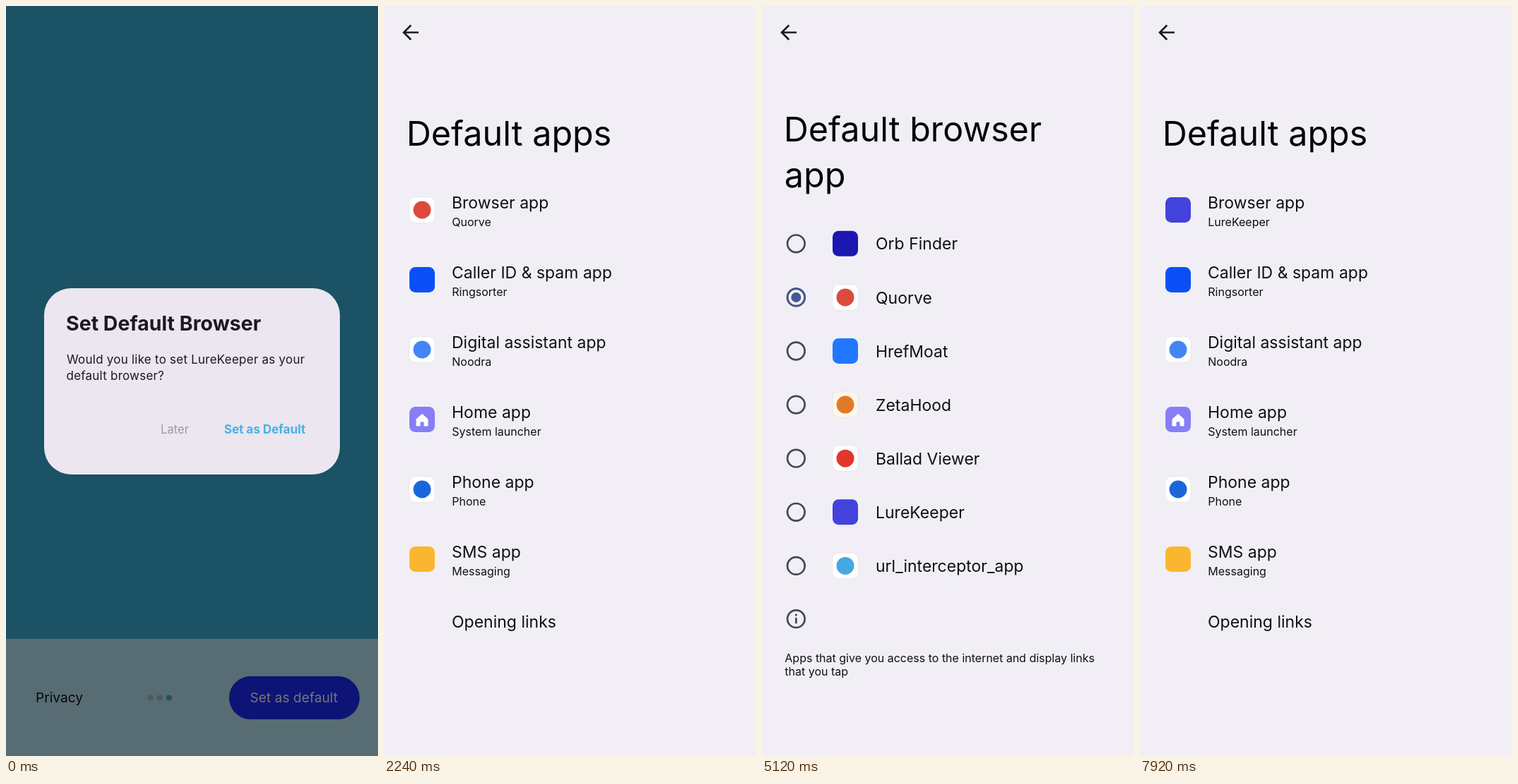
Recreate the animation shown at these times as an HTML page. Size 527 by 1063 pixels, loop 8 s.

```html
<!DOCTYPE html>
<html lang="en">
<head>
<meta charset="utf-8">
<title>Set default browser</title>
<style>
  html, body { margin: 0; width: 100%; height: 100%; overflow: hidden; background: #f1eff5; }
  svg { display: block; width: 100%; height: 100%; }
  text { font-family: Inter, Roboto, sans-serif; font-optical-sizing: none; fill: #101013; white-space: pre; }
  .head { font-size: 48.5px; fill: #050506; }
  .item { font-size: 23px; }
  .note { font-size: 16px; }
  .title { font-size: 28.5px; font-weight: 700; fill: #1c1a21; }
  .body { font-size: 17px; letter-spacing: .23px; fill: #1c1a21; }
  .later { font-size: 16.6px; fill: #9c99a1; }
  .accept { font-size: 17px; font-weight: 700; fill: #41b4e6; }
  .bar { font-size: 19.2px; }
  .line { fill: none; stroke: #1d1b21; stroke-width: 2.7; }
  .ring { fill: none; stroke: #48464e; stroke-width: 2.7; }
  .on .ring { stroke: #43598f; }
  .on .dot { fill: #43598f; }
  .wave, .dot { transform-box: fill-box; transform-origin: center; }
</style>
</head>
<body>
<svg viewBox="0 0 527 1063" preserveAspectRatio="none">
  <defs>
    <clipPath id="pillClip"><rect x="293" y="573" width="148" height="54" rx="27"/></clipPath>
    <clipPath id="rowClip"><rect y="240" width="527" height="99"/></clipPath>
    <clipPath id="pickClip"><rect y="680" width="527" height="76"/></clipPath>
  </defs>
  <g id="welcome"></g>
  <g id="apps"></g>
  <g id="choose"></g>
</svg>
<script>
const LOOP = 8000, STEP = 80, W = 527, SHIFT = -130;
const GLIDE = 'cubic-bezier(.05,.7,.1,1)', GLIDE_MS = 450;
const $ = id => document.getElementById(id);

const text = (x, y, cls, s, extra = '') => `<text x="${x}" y="${y}" class="${cls}" ${extra}>${s}</text>`;
const page = fill => `<rect width="527" height="1063" fill="${fill}"/>`;
const shade = id => `<rect id="${id}" width="527" height="1063" opacity="0"/>`;
const arrow = '<path class="line" d="M49 37.5H28.5M38.2 27.3L28 37.5L38.2 47.7"/>';
const ripple = (id, clip, cx, cy, r, fill) =>
  `<g id="${id}" clip-path="url(#${clip})" opacity="0"><circle class="wave" id="${id}Wave" cx="${cx}" cy="${cy}" r="${r}" fill="${fill}"/></g>`;

// App tile: a plain square, or a pale square holding a plain circle
const tile = (x, y, fill, dot) =>
  `<rect x="${x - 18}" y="${y - 18}" width="36" height="36" rx="8.5" fill="${fill}"` +
  (dot ? ` stroke="#000" stroke-opacity=".05"/><circle cx="${x}" cy="${y}" r="12.5" fill="${dot}"/>` : '/>');

const GUARD = ['LureKeeper', '#4342dc'];
const BROWSER = ['Quorve', '#fff', '#db4a3d'];

const choices = [
  ['Orb Finder', '#1c17b0'],
  BROWSER,
  ['HrefMoat', '#1f78ff'],
  ['ZetaHood', '#fdf6ea', '#e27a25'],
  ['Ballad Viewer', '#fff', '#e0362e'],
  GUARD,
  ['url_interceptor_app', '#fff', '#45a8e2']
];

const roles = [
  ['Caller ID &amp; spam app', 'Ringsorter', '#0a50f6'],
  ['Digital assistant app', 'Noodra', '#fff', '#4285f4'],
  ['Home app', 'System launcher', '#877ef7'],
  ['Phone app', 'Phone', '#fff', '#1b66dc'],
  ['SMS app', 'Messaging', '#fbb630']
];

$('welcome').innerHTML = page('#3db4dc') +
  '<rect y="897" width="527" height="166" fill="#c1ecfc"/>' +
  '<rect x="316" y="950" width="185" height="61" rx="30.5" fill="#1c2cff"/>' +
  text(42, 987, 'bar', 'Privacy') +
  text(345.5, 987, 'bar', 'Set as default', 'style="fill:#fff"') +
  [204.5, 217.7, 231].map((x, i) =>
    `<circle cx="${x}" cy="980.5" r="4" fill="${i < 2 ? '#a0c8d6' : '#3fb0dc'}"/>`).join('') +
  '<rect id="scrim" width="527" height="1063" opacity=".54"/>' +
  '<g id="dialog"><rect x="54" y="400" width="419" height="264" rx="38" fill="#ebe6ef"/>' +
  text(85, 460, 'title', 'Set Default Browser') +
  text(86, 507, 'body', `Would you like to set ${GUARD[0]} as your`) +
  text(85.5, 530, 'body', 'default browser?') +
  ripple('press', 'pillClip', 367, 600, 82, '#2348c8') +
  text(219, 605.5, 'later', 'Later') +
  text(309, 605.5, 'accept', 'Set as Default') +
  '</g>' + shade('welcomeShade');

const role = (i, name, app, ...look) =>
  tile(54, 289 + 99 * i, ...look) +
  text(96, 287 + 99 * i, 'item', name) + text(96.3, 312 + 99 * i, 'note', app);

$('apps').innerHTML = page('#f1eff5') + arrow +
  text(31.8, 198, 'head', 'Default apps') +
  '<g id="appList">' + ripple('row', 'rowClip', 264, 290, 285, '#000') +
  `<g id="before">${role(0, 'Browser app', ...BROWSER)}</g>` +
  `<g id="after">${role(0, 'Browser app', ...GUARD)}</g>` +
  roles.map((r, i) => role(i + 1, ...r)).join('') +
  '<path d="M54 578.5L62 585.5V595H57V589H51V595H46V585.5Z" fill="#fff" stroke="#fff" stroke-linejoin="round"/>' +
  text(96, 881, 'item', 'Opening links') +
  '</g>' + shade('appsShade');

const choice = ([name, ...look], i) => {
  const y = 336.8 + 76.1 * i;
  const ring = `<circle class="ring" cx="48.3" cy="${y}" r="12.3"/>`;
  const on = name === BROWSER[0] ? 'old' : name === GUARD[0] ? 'new' : '';
  return ring +
    (on ? `<g class="on" id="${on}">${ring}<circle class="dot" id="${on}Dot" cx="48.3" cy="${y}" r="7"/></g>` : '') +
    tile(118, y, ...look) + text(161, y + 8.6, 'item', name);
};

$('choose').innerHTML = page('#f1eff5') +
  '<circle id="tap" cx="38" cy="37.5" r="27" opacity="0"/>' + arrow +
  text(30.8, 192, 'head', 'Default browser') + text(31.8, 257, 'head', 'app') +
  '<g id="choiceList">' + ripple('pick', 'pickClip', 200, 718, 345, '#000') +
  choices.map(choice).join('') +
  '<circle class="ring" cx="48.3" cy="868.7" r="12.3"/>' +
  '<path class="ring" d="M48.3 867V875.3M48.3 861.8V864.6"/>' +
  text(32.3, 929.5, 'note', 'Apps that give you access to the internet and display links') +
  text(32.3, 949, 'note', 'that you tap') +
  '</g>';

// Each track is a list of [ms, value, easing towards the next point]
const tracks = [];
function track(id, prop, points) {
  const frames = points.map(([ms, v, easing = 'linear']) => ({ offset: ms / LOOP, [prop]: v, easing }));
  frames.unshift({ offset: 0, [prop]: points[0][1] });
  frames.push({ offset: 1, [prop]: points[points.length - 1][1] });
  const a = $(id).animate(frames, { duration: LOOP, fill: 'both' });
  a.pause();
  tracks.push(a);
}
const fade = (id, ...points) => track(id, 'opacity', points);
const grow = (id, from, to, a = 0.15, b = 1) =>
  track(id, 'transform', [[from, `scale(${a})`, 'ease-out'], [to, `scale(${b})`]]);
const glide = (id, prop, show, ...moves) =>
  track(id, prop, moves.flatMap(([ms, a, b]) => [[ms, show(a), GLIDE], [ms + GLIDE_MS, show(b)]]));
const slide = (id, ...moves) => glide(id, 'transform', x => `translateX(${x}px)`, ...moves);
const dim = (id, ...moves) => glide(id, 'opacity', v => v, ...moves);

const OPEN = 1044, NEXT = 3440, BACK = 7400;

fade('press', [120, 0], [400, 0.1], [880, 0.1], [960, 0.1]);
grow('pressWave', 120, 740);
fade('dialog', [880, 1], [960, 0.75], [1040, 0.735]);
fade('scrim', [880, 0.54], [960, 0.457]);

slide('welcome', [OPEN, 0, SHIFT]);
dim('welcomeShade', [OPEN, 0, 0.15]);
slide('apps', [OPEN, W, 0], [NEXT, 0, SHIFT], [BACK, SHIFT, 0]);
dim('appsShade', [NEXT, 0, 0.15], [BACK, 0.15, 0]);
slide('choose', [NEXT, W, 0], [BACK, 0, W]);

fade('appList', [1400, 0], [1520, 1]);
fade('choiceList', [3780, 0], [3960, 1]);

fade('row', [3080, 0], [3300, 0.23], [4300, 0.23], [4500, 0]);
grow('rowWave', 3080, 3440);
fade('pick', [5320, 0], [5560, 0.22], [5760, 0.22], [6160, 0]);
grow('pickWave', 5320, 5760);
fade('old', [5600, 1], [5760, 0]);
grow('oldDot', 5560, 5760, 1, 0);
fade('new', [5600, 0], [5760, 1]);
grow('newDot', 5600, 5840, 0, 1);
fade('tap', [7240, 0], [7360, 0.12], [7600, 0]);

fade('before', [6000, 1], [6000, 0]);
fade('after', [6000, 0], [6000, 1]);

const start = performance.now();
function draw() {
  const ms = (performance.now() - start) % LOOP;
  const held = Math.floor(ms / STEP) * STEP;
  for (const a of tracks) a.currentTime = held;
  requestAnimationFrame(draw);
}
draw();
</script>
</body>
</html>
```
